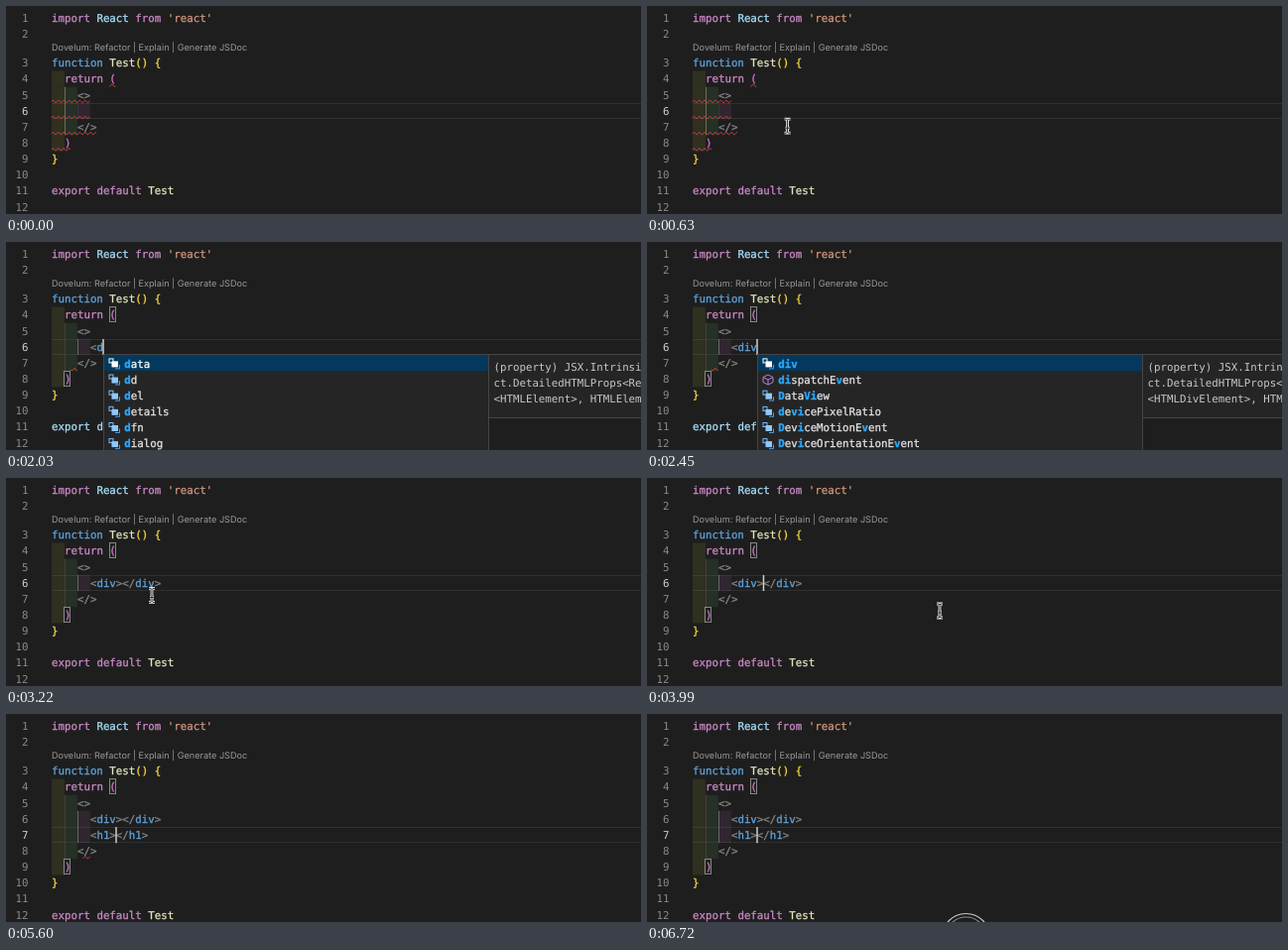
Write an HTML page with a canvas that moves like this. It is 640 px wide and 210 px high and loops after 6.79 s.

```html
<!DOCTYPE html>
<html lang="en">
<head>
<meta charset="utf-8">
<title>Typing JSX in an editor</title>
<style>
html, body { margin: 0; width: 100%; height: 100%; overflow: hidden; background: #1e1e1e; }
canvas { display: block; width: 640px; height: 210px; }
</style>
</head>
<body>
<canvas id="stage" width="640" height="210"></canvas>
<script>
const ctx = document.getElementById('stage').getContext('2d');
const LOOP = 6790, STEP = 70, LEFT = 46, CHAR = 6.485, ROW = 16.15;
const MONO = '10.77px "DejaVu Sans Mono", monospace';
const PINK = '#c988c4', PALE = '#a6def9', BLUE = '#5ea2da', GREY = '#848484', PLAIN = '#e2e2e2', GOLD = '#f8d840';

const COLORS = {
  import: PINK, from: PINK, return: PINK, export: PINK, default: PINK,
  React: PALE, "'react'": '#d0947c', Test: '#e4e4bc',
  '<': GREY, '</': GREY, '>': GREY, '{': GOLD, '}': GOLD
};

// Start time and text of the edited line; "|" is the caret.
const EDITS = [
  [0, '|'], [1750, '<|'], [1960, '<d|'], [2170, '<di|'], [2310, '<div|'],
  [2590, '<div>|</div>'], [4410, '<div></div>|'],
  [4620, '|'], [4830, '<|'], [5110, '<h|'], [5320, '<h1|'], [5600, '<h1>|</h1>']
];
const FOCUS = 770, NEW_LINE = 4620;

const SUGGESTIONS = {
  '<': ['React', 'Test', 'arguments', 'default', 'AbortController', 'AbortSignal'],
  '<d': ['data', 'dd', 'del', 'details', 'dfn', 'dialog'],
  '<di': ['dialog', 'div', 'dispatchEvent', 'devicePixelRatio', 'DeviceMotionEvent', 'DeviceOrientationEvent'],
  '<div': ['div', 'dispatchEvent', 'DataView', 'devicePixelRatio', 'DeviceMotionEvent', 'DeviceOrientationEvent'],
  '<h': ['h1', 'h2', 'h3', 'h4', 'h5', 'h6'],
  '<h1': ['h1']
};
const METHODS = ['Test', 'dispatchEvent'];

// Pointer paths: time, x, y
const POINTER = [
  [[70, 255, 204], [350, 200, 150], [700, 127, 114], [840, 116, 109.5], [1750, 116, 109.5]],
  [[3150, 116, 109.5], [3430, 240, 145], [3710, 303, 148], [3990, 295, 134], [4340, 313, 108], [4620, 313, 108]],
  [[6160, 313, 108], [6370, 374, 150], [6650, 325, 212]]
];

const rowY = n => n < 3 ? 12 + (n - 1) * ROW : 57.5 + (n - 3) * ROW;
const colX = c => LEFT + c * CHAR;

function text(s, x, y, color, font = MONO) {
  ctx.font = font;
  ctx.fillStyle = color;
  ctx.fillText(s, x, y + 3.7);
}

// Code glyphs get a hairline of extra weight.
function codeText(s, x, y, color, font) {
  text(s, x, y, color, font);
  ctx.strokeStyle = color;
  ctx.lineWidth = 0.3;
  ctx.strokeText(s, x, y + 3.7);
}

function rect(x, y, w, h, color) {
  ctx.fillStyle = color;
  ctx.fillRect(x, y, w, h);
}

function outline(x, y, w, h, color) {
  ctx.strokeStyle = color;
  ctx.lineWidth = 1;
  ctx.strokeRect(x, y, w, h);
}

function strokePath(points, color, width) {
  ctx.beginPath();
  for (const [x, y, move] of points) move ? ctx.moveTo(x, y) : ctx.lineTo(x, y);
  ctx.strokeStyle = color;
  ctx.lineWidth = width;
  ctx.stroke();
}

function squiggle(row, from, to) {
  const points = [], y = rowY(row) + 6.6;
  for (let x = colX(from); x <= colX(to); x += 0.5)
    points.push([x, y - 1.1 * Math.sin((x - LEFT) * 2 * Math.PI / 5.4), !points.length]);
  strokePath(points, '#e04545', 1);
}

function writeCode(line, row, inTag) {
  const indent = line.search(/\S/);
  for (const { 0: word, index } of line.matchAll(/'\w+'|\w+|<\/?|\S/g)) {
    let color = COLORS[word] || BLUE;
    if (/[()]/.test(word)) color = indent > 0 ? '#da70d6' : GOLD;
    if (inTag && row > 10) color = PALE;
    if (line.trim() === '<') color = PLAIN;
    codeText(word, colX(index), rowY(row), color);
  }
}

function shadeIndent(row, columns) {
  const tints = ['255,255,64', '127,255,127', '255,127,255'];
  for (let i = 0; i < columns / 2; i++)
    rect(colX(i * 2), rowY(row) - ROW / 2, CHAR * 2, ROW, `rgba(${tints[i]},.08)`);
}

function guide(column, first, last, color) {
  rect(Math.round(colX(column)), rowY(first) - ROW / 2, 1, (last - first + 1) * ROW, color);
}

// Letters matched in order, or with the last two swapped.
function matchedLetters(name, typed) {
  const swapped = typed.slice(0, -2) + [...typed.slice(-2)].reverse().join('');
  for (const query of [typed, swapped]) {
    const hits = [];
    let at = -1;
    for (const c of query) hits.push(at = name.toLowerCase().indexOf(c, at + 1));
    if (!hits.includes(-1) && hits.every((h, i) => !i || h > hits[i - 1])) return hits;
  }
  return [];
}

function icon(x, y, method, selected) {
  const color = selected ? '#fff' : method ? '#b180d7' : '#75beff';
  if (method) {
    strokePath([[x, y - 5, 1], [x + 5, y - 2.5], [x + 5, y + 2.5], [x, y + 5], [x - 5, y + 2.5],
      [x - 5, y - 2.5], [x, y - 5], [x - 5, y - 2.5, 1], [x, y], [x + 5, y - 2.5], [x, y, 1], [x, y + 5]], color, 1);
  } else {
    outline(x - 5, y - 5, 4, 4, color);
    strokePath([[x + 1, y + 5, 1], [x + 5.5, y + 5], [x + 5.5, y + 1]], '#4a9fe8', 1);
    rect(x - 2.5, y - 2.5, 6.5, 6, selected ? '#fff' : '#8fc8fa');
  }
}

function popup(x, y, line) {
  const items = SUGGESTIONS[line], typed = line.slice(1), width = 388;
  x = Math.round(x) + 0.5;
  y = Math.round(y) - 0.5;
  rect(x, y, width, items.length * ROW + 2, '#252526');
  outline(x, y, width, items.length * ROW + 2, '#454545');
  rect(x + 0.5, y + 0.5, width - 1, 16, '#04395e');
  items.forEach((name, i) => {
    const mid = y + 9.4 + i * ROW, hits = matchedLetters(name, typed);
    icon(x + 10.5, mid, METHODS.includes(name), i === 0);
    [...name].forEach((c, k) => {
      const hit = hits.includes(k);
      codeText(c, x + 20.7 + k * CHAR, mid, hit ? '#2aaaff' : i ? PLAIN : '#fff', hit ? 'bold ' + MONO : MONO);
    });
  });
  const type = { div: 'HTMLDivElement', h: 'HTMLHeadingElement', h1: 'HTMLHeadingElement' }[typed] || 'HTMLElement';
  const docs = typed ? [
    `(property) JSX.IntrinsicElements.${items[0]}: Rea`,
    'ct.DetailedHTMLProps<React.HTMLAttributes',
    `<${type}>, ${type}>`
  ] : ['(alias) namespace React'];
  const docX = x + width, docH = docs.length * 16 + 16;
  rect(docX, y, 280, docH, '#252526');
  outline(docX, y, 280, docH, '#454545');
  docs.forEach((s, i) => text(s, docX + 5, y + 13 + i * 15.8, '#c8c8c8'));
}

function pointer(t) {
  const path = POINTER.find(p => t >= p[0][0] && t < p[p.length - 1][0]);
  if (!path) return;
  const i = path.findIndex(p => p[0] > t);
  const [t0, x0, y0] = path[i - 1], [t1, x1, y1] = path[i], k = (t - t0) / (t1 - t0);
  const x = x0 + (x1 - x0) * k, y = y0 + (y1 - y0) * k;
  const beam = [[x - 3, y - 7, 1], [x - 1, y - 7], [x, y - 6], [x + 1, y - 7], [x + 3, y - 7],
    [x, y - 6, 1], [x, y + 6], [x - 3, y + 7, 1], [x - 1, y + 7], [x, y + 6], [x + 1, y + 7], [x + 3, y + 7],
    [x - 2, y + 2, 1], [x + 2, y + 2]];
  strokePath(beam, '#f0f0f0', 2.8);
  strokePath(beam, '#111', 0.9);
}

function recordButton() {
  ctx.lineWidth = 1.2;
  for (const [r, color] of [[24, '#c8c8c8'], [20.5, '#8a8a8a']]) {
    ctx.beginPath();
    ctx.arc(321.5, 225.5, r, 0, 7);
    ctx.fillStyle = '#1e1e1e';
    ctx.fill();
    ctx.strokeStyle = color;
    ctx.stroke();
  }
}

function draw(t) {
  const [start, raw] = EDITS.filter(e => e[0] <= t).pop();
  const caretCol = 6 + raw.indexOf('|'), typed = raw.replace('|', '');
  const added = t >= NEW_LINE, current = added ? 7 : 6, close = current + 1;
  const inTag = /^<\w+$/.test(typed);
  const body = (added ? ['<div></div>', typed] : [typed]).map(s => '      ' + s);
  const lines = ["import React from 'react'", '', 'function Test() {', '  return (', '    <>',
    ...body, '    </>', '  )', '}', '', 'export default Test'];

  ctx.textRendering = 'geometricPrecision';
  rect(0, 0, 640, 210, '#1e1e1e');
  for (const edge of [-8, 7]) rect(LEFT, Math.round(rowY(current) + edge), 594, 1, '#303030');

  lines.forEach((line, i) => shadeIndent(i + 1, line.match(/^ */)[0].length));
  guide(2, 5, close, t < 1750 ? '#707058' : '#404040');
  guide(4, 6, current, t < 1750 ? '#3a353c' : '#686868');

  for (let n = 1; n <= 12; n++)
    text(n, 22.5 - String(n).length * CHAR, rowY(n), n === current ? '#d0d0d0' : '#8a8a8a');
  text('Dovelum: Refactor | Explain | Generate JSDoc', LEFT, 41.7, '#999', '9.13px Inter, sans-serif');

  if (t >= FOCUS)
    for (const [col, row] of [[9, 4], [2, close + 1]]) {
      const x = Math.floor(colX(col)) + 0.5, y = Math.floor(rowY(row) - 8) + 0.5;
      rect(x, y, 6, 15, 'rgba(0,100,0,.1)');
      outline(x, y, 6, 15, '#888');
    }
  lines.forEach((line, i) => writeCode(line, i + 1, inTag));

  if (t < 1750) {
    squiggle(4, 9, 10);
    [6, 6, 7, 3].forEach((end, i) => squiggle(5 + i, 0, end));
  } else if (SUGGESTIONS[typed]) squiggle(close, 2.9, 4);
  else if (t >= 5600 && t < 5810) squiggle(close, 4.9, 6);

  if (t >= FOCUS && Math.floor((t - Math.max(start, FOCUS)) / 500) % 2 === 0)
    rect(colX(caretCol) - 0.6, rowY(current) - 8, 1.5, ROW, '#d0d0c8');
  if (SUGGESTIONS[typed] && (typed !== '<' || t >= start + STEP))
    popup(colX(caretCol), rowY(current) + 8, typed);
  pointer(t);
  if (t >= 6650) recordButton();
}

function frame() {
  draw(Math.floor(performance.now() % LOOP / STEP) * STEP);
  requestAnimationFrame(frame);
}
frame();
</script>
</body>
</html>
```
